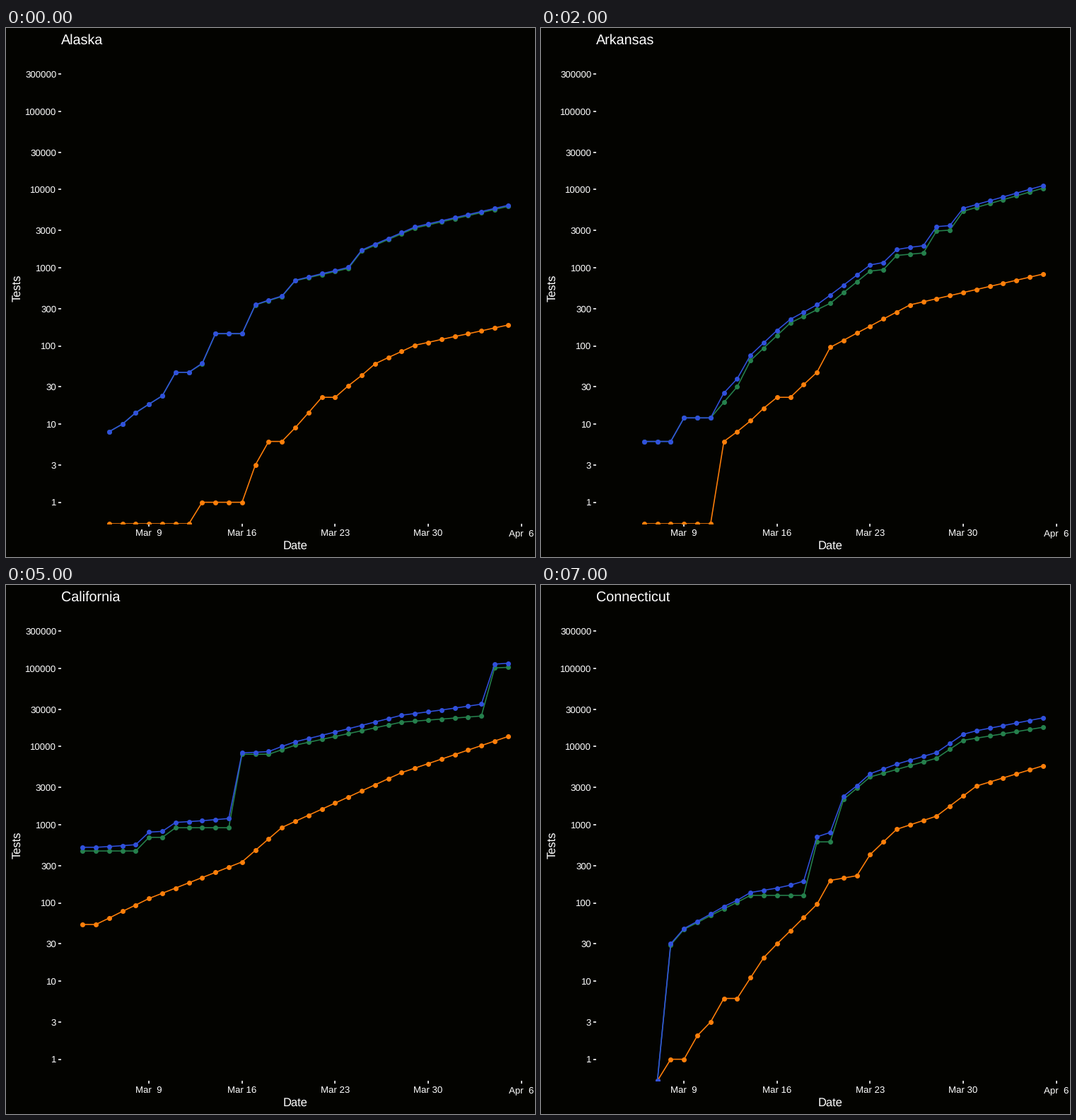
These frames come from a looping animation (748 by 748 pixels, 8 s). A matplotlib script:

```python
import numpy as np
import matplotlib.pyplot as plt
from matplotlib.animation import FuncAnimation
from matplotlib.patches import Rectangle

SIZE, DPI = 748, 68
PT = 72 / DPI                      # points per pixel
LEFT, TOP, RIGHT, BOTTOM = 78, 34, 739.75, 701
DAY_W = 18.797                     # pixels per day
MAR_9 = 202.2
BACK, BLUE, ORANGE, GREEN = "#030300", "#3050DC", "#FF7F0A", "#25804C"

plt.rcParams.update({"font.family": "Liberation Sans", "text.hinting": "none"})


def growth(*keys):
    """Whole daily counts growing exponentially between (March day, count) keys."""
    days, counts = np.array(keys, float).T
    span = np.arange(days[0], days[-1] + 1)
    logs = np.interp(span, days, np.log(np.maximum(counts, 0.1)))
    return span, np.round(np.exp(logs))


# Name, negative tests, positive tests; the total is their sum.
STATES = [
    ("Alaska",
     growth((6, 8), (10, 23), (11, 46), (12, 46), (13, 59), (14, 143),
            (16, 143), (17, 334), (19, 429), (20, 682), (24, 982),
            (25, 1640), (29, 3220), (36, 6099)),
     growth((6, 0), (12, 0), (13, 1), (16, 1), (17, 3), (18, 6), (19, 6),
            (22, 22), (23, 22), (26, 59), (29, 102), (36, 185))),
    ("Alabama",
     growth((7, 0), (9, 0), (10, 10), (12, 10), (13, 22), (21, 28),
            (22, 1464), (26, 3593), (36, 11282)),
     growth((7, 0), (12, 0), (13, 1), (14, 6), (25, 283), (26, 506),
            (36, 1796))),
    ("Arkansas",
     growth((6, 6), (8, 6), (9, 12), (11, 12), (13, 30), (14, 65), (17, 197),
            (20, 351), (23, 906), (24, 947), (25, 1437), (27, 1545),
            (28, 2952), (29, 3027), (30, 5280), (36, 10412)),
     growth((6, 0), (11, 0), (12, 6), (16, 22), (17, 22), (19, 46), (20, 96),
            (26, 335), (36, 830))),
    ("American Samoa",
     growth((16, 0), (27, 0), (28, 3), (31, 3), (32, 20), (36, 20)),
     growth((16, 0), (36, 0))),
    ("Arizona",
     growth((4, 27), (7, 44), (9, 44), (14, 121), (18, 148), (22, 282),
            (26, 347), (27, 7455), (28, 7455), (29, 13000), (31, 18082),
            (36, 25141)),
     growth((4, 2), (5, 2), (7, 5), (9, 5), (11, 9), (13, 9), (17, 20),
            (23, 265), (27, 736), (36, 2269))),
    ("California",
     growth((4, 462), (8, 462), (9, 690), (10, 690), (11, 916), (15, 916),
            (16, 7981), (18, 7981), (20, 10424), (26, 17380), (28, 20549),
            (34, 24599), (35, 101674), (36, 103095)),
     growth((4, 53), (5, 53), (9, 114), (16, 335), (19, 924), (28, 4643),
            (36, 13438))),
    ("Colorado",
     growth((5, 19), (6, 46), (7, 55), (8, 104), (10, 142), (12, 299),
            (13, 522), (16, 627), (18, 1617), (21, 3317), (30, 12737),
            (36, 19300)),
     growth((5, 0), (6, 2), (7, 8), (9, 9), (11, 28), (13, 72), (15, 131),
            (16, 131), (19, 216), (24, 720), (30, 2627), (36, 4565))),
    ("Connecticut",
     growth((7, 0), (8, 29), (9, 46), (14, 125), (18, 125), (19, 604),
            (20, 604), (21, 2106), (23, 4085), (28, 7110), (30, 12029),
            (36, 17650)),
     growth((7, 0), (8, 1), (9, 1), (12, 6), (13, 6), (15, 20), (19, 96),
            (20, 194), (22, 223), (23, 415), (25, 875), (28, 1291),
            (31, 3128), (36, 5675))),
]


def to_x(day):
    return MAR_9 + DAY_W * (day - 9)


def to_y(counts):
    """Log scale; zero counts sit on the panel's lower edge."""
    counts = np.asarray(counts, float)
    y = 670.6 - 110.53 * np.log10(np.maximum(counts, 0.1))
    return np.where(counts > 0, y, BOTTOM)


fig = plt.figure(figsize=(SIZE / DPI, SIZE / DPI), dpi=DPI, facecolor=BACK)
ax = fig.add_axes([0, 0, 1, 1])
ax.set_xlim(0, SIZE)
ax.set_ylim(SIZE, 0)
ax.axis("off")


def label(x, y, text, px, **kw):
    return ax.text(x, y, text, fontsize=px * PT, color="white", va="baseline",
                   rotation_mode="anchor", **kw)


def tick(xs, ys):
    ax.plot(xs, ys, color="white", lw=1.6 * PT, solid_capstyle="butt")


title = label(LEFT, 22.4, "", 19.8)
label(409, 736.5, "Date", 16.5, ha="center")
label(20, 368, "Tests", 16.5, ha="center", rotation=90)

for value in [m * 10 ** e for e in range(6) for m in (1, 3)]:
    y = float(to_y(value))
    tick([LEFT - 4.1, LEFT], [y, y])
    label(71.3, y + 4.8, str(value), 13.2, ha="right")

for week, text in enumerate(["Mar  9", "Mar 16", "Mar 23", "Mar 30", "Apr  6"]):
    x = to_x(9 + 7 * week)
    tick([x, x], [BOTTOM, BOTTOM + 4.1])
    label(x, 718, text, 13.2, ha="center")

panel = Rectangle((LEFT, TOP), RIGHT - LEFT, BOTTOM - TOP,
                  transform=ax.transData)


def make_curve(color):
    line, = ax.plot([], [], color=color, lw=1.6 * PT, marker="o",
                    ms=7 * PT, mew=0, snap=False)
    line.set_clip_path(panel)
    return line


curves = [make_curve(c) for c in (GREEN, ORANGE, BLUE)]


def draw(i):
    name, (days, negative), (_, positive) = STATES[i]
    title.set_text(name)
    for curve, counts in zip(curves, (negative, positive, negative + positive)):
        curve.set_data(to_x(days), to_y(counts))
    return [title, *curves]


anim = FuncAnimation(fig, draw, frames=len(STATES), init_func=lambda: draw(0),
                     interval=1000, repeat=True, repeat_delay=0)
plt.show()
```
